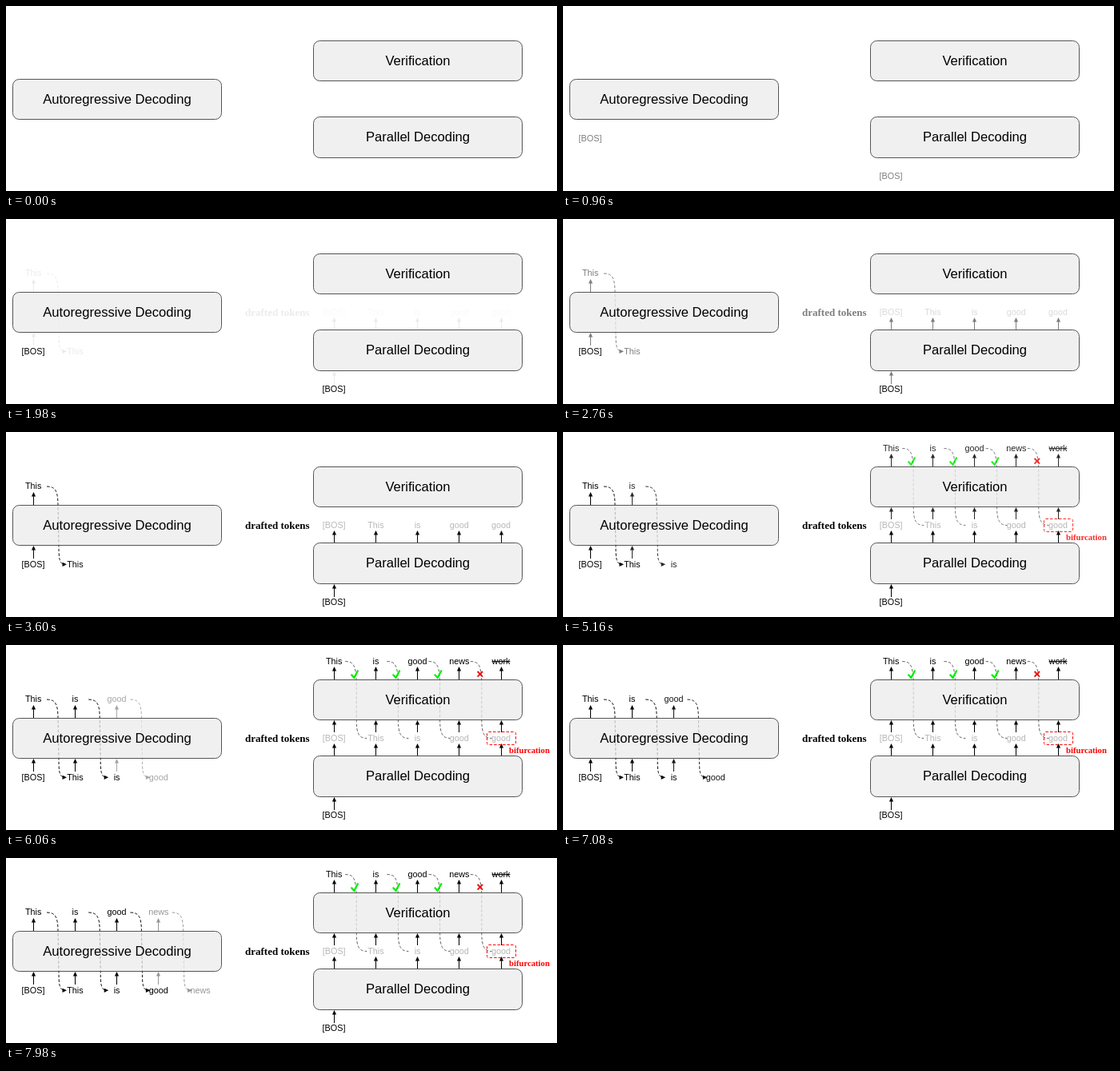
These frames come from a looping animation (689x231 px, 8000 ms). An HTML page:

```html
<!DOCTYPE html>
<html lang="en">
<head>
<meta charset="utf-8">
<title>Autoregressive and parallel decoding</title>
<style>
  html, body { margin: 0; width: 100%; height: 100%; overflow: hidden; background: #fff; }
  svg { display: block; width: 689px; height: 231px; }
  text { font: 10.8px "Liberation Sans", Arial, sans-serif; text-anchor: middle; }
  .title { font-size: 16.6px; }
  .token { fill: #b7b7b7; }
  .struck { text-decoration: line-through; }
  .serif { font-family: "Liberation Serif", "Times New Roman", serif; font-weight: bold; text-anchor: start; }
  .box { fill: rgba(235, 235, 235, .75); stroke: #555; }
  .line { fill: none; stroke: #000; }
  .dashed { fill: none; stroke: #111; stroke-dasharray: 3.5 2.2; }
  .soft { stroke: #666; }
  .tick { fill: none; stroke: #0e0; stroke-width: 2.2; }
  .cross { fill: none; stroke: #e11; stroke-width: 2; }
  .alert { fill: none; stroke: #f00; stroke-dasharray: 3.5 2; }
</style>
</head>
<body>
<svg viewBox="0 0 689 231"></svg>
<script>
const LOOP = 8000, STAGE = 1800, FIRST = 40, STAGES = 5, STEP = 52.2;
const svg = document.querySelector('svg');

function add(parent, tag, attrs, content = '') {
  const el = document.createElementNS('http://www.w3.org/2000/svg', tag);
  for (const key in attrs) el.setAttribute(key, attrs[key]);
  el.textContent = content;
  return parent.appendChild(el);
}

const layer = () => Array.from({ length: STAGES }, () => add(svg, 'g', {}));
const path = (parent, d, cls) => add(parent, 'path', { d, class: cls });
const label = (parent, x, y, content, cls = '') => add(parent, 'text', { x, y, class: cls }, content);

function arrowUp(parent, x, from, to) {
  const cx = Math.floor(x) + .5;
  path(parent, `M${cx} ${from}V${to + 3}`, 'line');
  path(parent, `M${cx} ${to}l2.6 5.5h-5.2z`, '');
}

// Curves lie under the translucent boxes, everything else above them.
const under = layer();
const boxes = add(svg, 'g', {});
const over = layer();

function box(x, y, height, title) {
  add(boxes, 'rect', { x, y, width: 261, height, rx: 8, class: 'box' });
  label(boxes, x + 130.5, y + 30.7, title, 'title');
}
box(8.5, 91.5, 50, 'Autoregressive Decoding');
box(384.5, 43.5, 50, 'Verification');
box(384.5, 138.5, 51, 'Parallel Decoding');

// Left: each generated word is fed back as the next input.
label(over[0], 34, 169, '[BOS]');
['This', 'is', 'good', 'news'].forEach((word, i) => {
  const g = over[i + 1], x = 34.2 + i * STEP, shift = i * STEP;
  arrowUp(g, x, 158, 142);
  arrowUp(g, x, 91, 75);
  label(g, x, 71, word);
  label(g, x + STEP, 169, word);
  const curve = path(under[i + 1],
    'M51 68C62 68 65 74 65 92L66 140C66 155 66 165 73 165', 'dashed');
  const head = path(under[i + 1], 'M76 165.3l-5.5 -2.6v5.2z', '');
  for (const el of [curve, head]) el.setAttribute('transform', `translate(${shift})`);
});

// Right: drafted tokens, then their verification.
label(over[0], 410, 216, '[BOS]');
arrowUp(over[1], 410.2, 206, 190);
label(over[1], 299, 121, 'drafted tokens', 'serif').style.fontSize = '13px';

const drafted = ['[BOS]', 'This', 'is', 'good', 'good'];
const verified = ['This', 'is', 'good', 'news', 'work'];
drafted.forEach((token, i) => {
  const x = 410.2 + i * STEP;
  arrowUp(over[1], x, 138, 123);
  label(over[1], x, 120, token, 'token');
  arrowUp(over[2], x, 109, 94);
  arrowUp(over[2], x, 43, 27);
  label(over[2], x, 24, verified[i], i === 4 ? 'struck' : '');
  if (i === 4) return;
  path(under[2], `M${x + 14} 20.5c11 0 13 6 14 25v47c0 16 2 24 13 24`, 'dashed soft');
  if (i < 3) path(over[2], `M${x + 21.3} 36.8l3.8 4l5 -9.3`, 'tick');
  else path(over[2], `M${x + 22.8} 33l6.4 6.6m0 -6.6l-6.4 6.6`, 'cross');
});
add(over[2], 'rect', { x: 601.5, y: 108.5, width: 36, height: 16, rx: 2, class: 'alert' });
const note = label(over[2], 629, 135, 'bifurcation', 'serif');
note.style.fontSize = '10.7px';
note.style.fill = '#f00';

function draw(now) {
  const time = now % LOOP;
  for (let i = 0; i < STAGES; i++) {
    const shown = Math.min(1, Math.max(0, (time - FIRST - i * STAGE) / STAGE));
    under[i].setAttribute('opacity', shown);
    over[i].setAttribute('opacity', shown);
  }
}

const start = performance.now();
function frame() {
  draw(performance.now() - start);
  requestAnimationFrame(frame);
}
frame();
</script>
</body>
</html>
```
